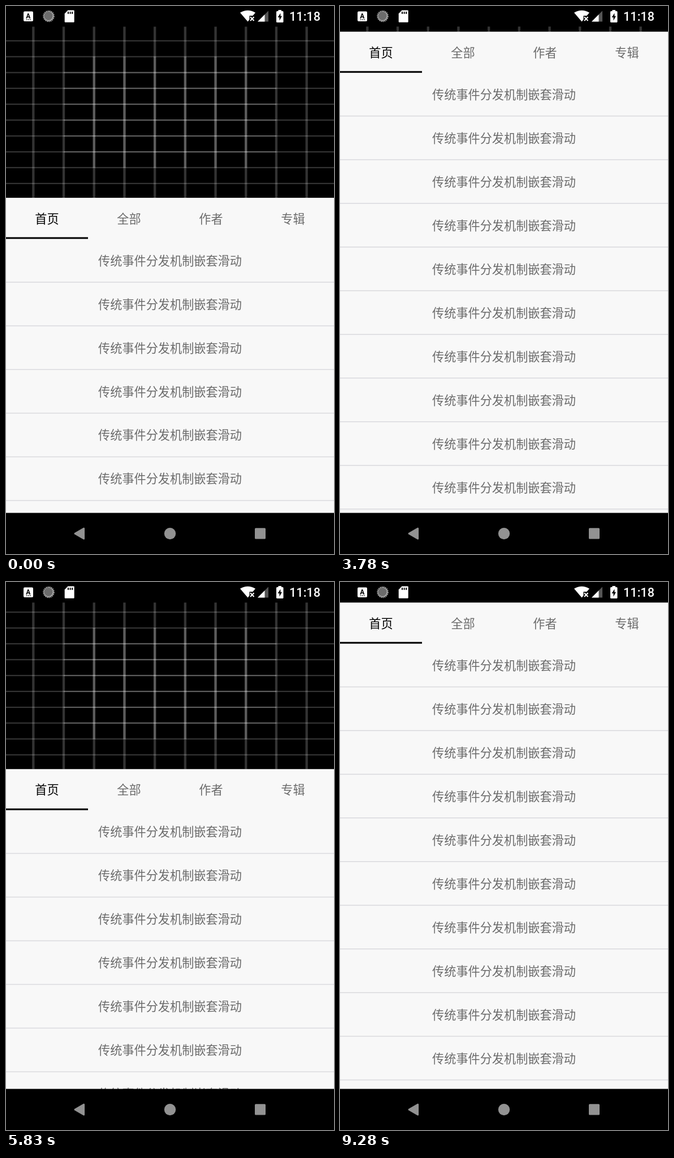
An HTML page with a canvas for the animation above (9470 ms loop, 580 by 966 pixels).

```html
<!DOCTYPE html>
<html lang="zh-CN">
<head>
<meta charset="utf-8">
<title>嵌套滑动</title>
<style>
html, body { margin: 0; width: 100%; height: 100%; overflow: hidden; background: #000; }
canvas { display: block; }
</style>
</head>
<body>
<canvas id="stage" width="580" height="966" lang="zh-CN"></canvas>
<script>
const ctx = document.getElementById('stage').getContext('2d');
const LOOP = 9470;

// The app is laid out on a 768 x 1280 screen, scaled down to the stage
const W = 768, H = 1280, SX = 580 / W, SY = 966 / H;
const BAR = 48, OPEN = 448, TAB = 96, ROW = 102, BOTTOM = 1184;
const CJK = '28px "Noto Sans CJK SC", "Noto Sans CJK", "Noto Sans SC", sans-serif';
const TABS = ['首页', '全部', '作者', '专辑'];
const LABEL = '传统事件分发机制嵌套滑动';

// Swipes of the header: start, end, steps, from, to, acceleration
const SWIPES = [
  [2270, 2400, 4, OPEN, 241, 1.4],
  [2660, 2750, 3, 241, BAR, 1.3],
  [3780, 4040, 7, BAR, OPEN, 1.8],
  [4440, 4580, 4, OPEN, BAR, 1.8],
  [4980, 5160, 5, BAR, OPEN, 1.7],
  [5830, 6090, 7, OPEN, BAR, 1.85]
];

function headerEdge(t) {
  let y = OPEN;
  for (const [start, end, steps, from, to, power] of SWIPES) {
    if (t < start) break;
    const k = Math.floor((t - start) / (end - start) * (steps - 1)) + 1;
    y = from + (to - from) * Math.pow(Math.min(1, k / steps), power);
  }
  return Math.round(y);
}

function listScroll(t) {
  if (t < 7410 || t >= 8350) return 0;
  const u = Math.floor((t - 7410) / 940 * 20) / 20;
  return Math.round(336 * Math.sin(Math.PI * u));
}

function rect(x, y, w, h, color) {
  ctx.fillStyle = color;
  ctx.fillRect(x, y, w, h);
}

function poly(points, color) {
  ctx.fillStyle = color;
  ctx.beginPath();
  points.forEach(([x, y]) => ctx.lineTo(x, y));
  ctx.closePath();
  ctx.fill();
}

function disc(x, y, r, color) {
  ctx.fillStyle = color;
  ctx.beginPath();
  ctx.arc(x, y, r, 0, Math.PI * 2);
  ctx.fill();
}

function rounded(x, y, w, h, r, color) {
  ctx.fillStyle = color;
  ctx.beginPath();
  ctx.roundRect(x, y, w, h, r);
  ctx.fill();
}

function text(str, x, y, color, font, align = 'center') {
  ctx.font = font;
  ctx.textAlign = align;
  ctx.fillStyle = color;
  ctx.fillText(str, x, y);
}

function clip(y, h, draw) {
  ctx.save();
  ctx.beginPath();
  ctx.rect(0, y, W, h);
  ctx.clip();
  draw();
  ctx.restore();
}

// Grid on a 108 x 108 field, with a second, shorter set of lines in the middle
function drawGrid(edge) {
  const height = OPEN - BAR;
  ctx.save();
  ctx.translate(0, edge - height);
  ctx.scale(W / 108, height / 108);
  ctx.strokeStyle = 'rgba(255,255,255,0.2)';
  ctx.lineWidth = 0.8;
  const line = (x1, y1, x2, y2) => {
    ctx.beginPath();
    ctx.moveTo(x1, y1);
    ctx.lineTo(x2, y2);
    ctx.stroke();
  };
  for (let p = 9; p <= 99; p += 10) {
    line(p, 0, p, 108);
    line(0, p, 108, p);
    if (p > 20 && p < 80) {
      line(p, 19, p, 89);
      line(19, p, 89, p);
    }
  }
  ctx.restore();
}

function drawTabs(edge) {
  const width = W / TABS.length;
  TABS.forEach((name, i) =>
    text(name, width * (i + 0.5), edge + 59, i ? '#6b6b6b' : '#000', CJK));
  rect(0, edge + TAB - 4, width, 4, '#000');
}

function drawList(edge, scroll) {
  const top = edge + TAB;
  clip(top, H - top, () => {
    for (let y = top - scroll % ROW; y < BOTTOM; y += ROW) {
      text(LABEL, W / 2, y + 61, '#6b6b6b', CJK);
      rect(0, y + ROW - 2, W, 2, '#dadade');
    }
  });
}

// Overscroll glow at the top of the list
function drawGlow(t) {
  if (t < 8350 || t >= 9280) return;
  const s = t < 8600 ? (t - 8350) / 250 : (9280 - t) / 680;
  const top = BAR + TAB, h = 81 * Math.sqrt(s), r = W * 1.2, k = h / 123.5;
  clip(top, 81, () => {
    ctx.fillStyle = `rgba(102,102,102,${0.2 * s})`;
    ctx.beginPath();
    ctx.ellipse(W / 2, top + h - r * k, r, r * k, 0, 0, Math.PI * 2);
    ctx.fill();
  });
}

function drawApp(t) {
  const edge = headerEdge(t);
  ctx.save();
  ctx.scale(SX, SY);
  if (edge > BAR) clip(BAR, H, () => drawGrid(edge));
  rect(0, edge, W, H - edge, '#f8f8f8');
  drawList(edge, listScroll(t));
  drawTabs(edge);
  drawGlow(t);
  rect(0, BOTTOM, W, H - BOTTOM, '#000');
  ctx.restore();
}

function drawStatus() {
  rounded(31, 9.5, 17, 17.5, 2, '#fff');
  text('A', 39.2, 21.5, '#000', '700 12px Roboto, sans-serif');
  for (const x of [36, 39, 42]) rect(x, 23.4, 1.6, 1.4, '#000');

  disc(75.5, 18, 9, '#a0a0a0');
  disc(75, 17.5, 7.4, '#6c6c6c');
  ctx.strokeStyle = '#a0a0a0';
  ctx.lineWidth = 2;
  ctx.setLineDash([1.8, 1.4]);
  ctx.beginPath();
  ctx.arc(75.5, 18, 9.3, 0, Math.PI * 2);
  ctx.stroke();
  ctx.setLineDash([]);

  poly([[109.5, 7.5], [120, 7.5], [120.7, 8.2], [120.7, 28.1], [120, 28.8],
    [104.4, 28.8], [103.7, 28.1], [103.7, 13.5]], '#fff');
  for (const x of [109, 112.6, 116.2]) rect(x, 10, 1.9, 4, '#000');

  // Wi-Fi fan with a cross
  ctx.fillStyle = '#fff';
  ctx.beginPath();
  ctx.moveTo(427.5, 27.5);
  ctx.lineTo(414, 11.8);
  ctx.quadraticCurveTo(427.5, 3.8, 441, 11.8);
  ctx.fill();
  rect(430.5, 17.2, 11, 11, '#000');
  ctx.strokeStyle = '#fff';
  ctx.lineWidth = 2;
  ctx.beginPath();
  ctx.moveTo(432, 19.2);
  ctx.lineTo(438.5, 26);
  ctx.moveTo(438.5, 19.2);
  ctx.lineTo(432, 26);
  ctx.stroke();

  poly([[445, 27.5], [464, 8.5], [464, 27.5]], '#555');
  poly([[445, 27.5], [457.5, 15], [457.5, 27.5]], '#fff');

  rect(481.5, 7, 5.5, 4, '#fff');
  rounded(478, 9, 12.5, 20, 1.5, '#fff');
  poly([[485.4, 12.5], [480.6, 20], [483.5, 20], [483.5, 25.8], [488, 17.8], [485.4, 17.8]], '#000');

  text('11:18', 555.9, 26.3, '#fff', '500 21.6px Roboto, sans-serif', 'right');
}

function drawNav() {
  const gray = '#929292';
  poly([[122, 930], [137.6, 921], [137.6, 939]], gray);
  ctx.strokeStyle = gray;
  ctx.lineWidth = 3;
  ctx.lineJoin = 'round';
  ctx.stroke();
  disc(290, 930, 10.2, gray);
  rounded(440, 920.2, 19, 19.2, 1.5, gray);
}

function draw(t) {
  rect(0, 0, 580, 966, '#000');
  drawApp(t);
  drawStatus();
  drawNav();
}

const begin = performance.now();
function tick() {
  draw((performance.now() - begin) % LOOP);
  requestAnimationFrame(tick);
}
tick();
</script>
</body>
</html>
```
